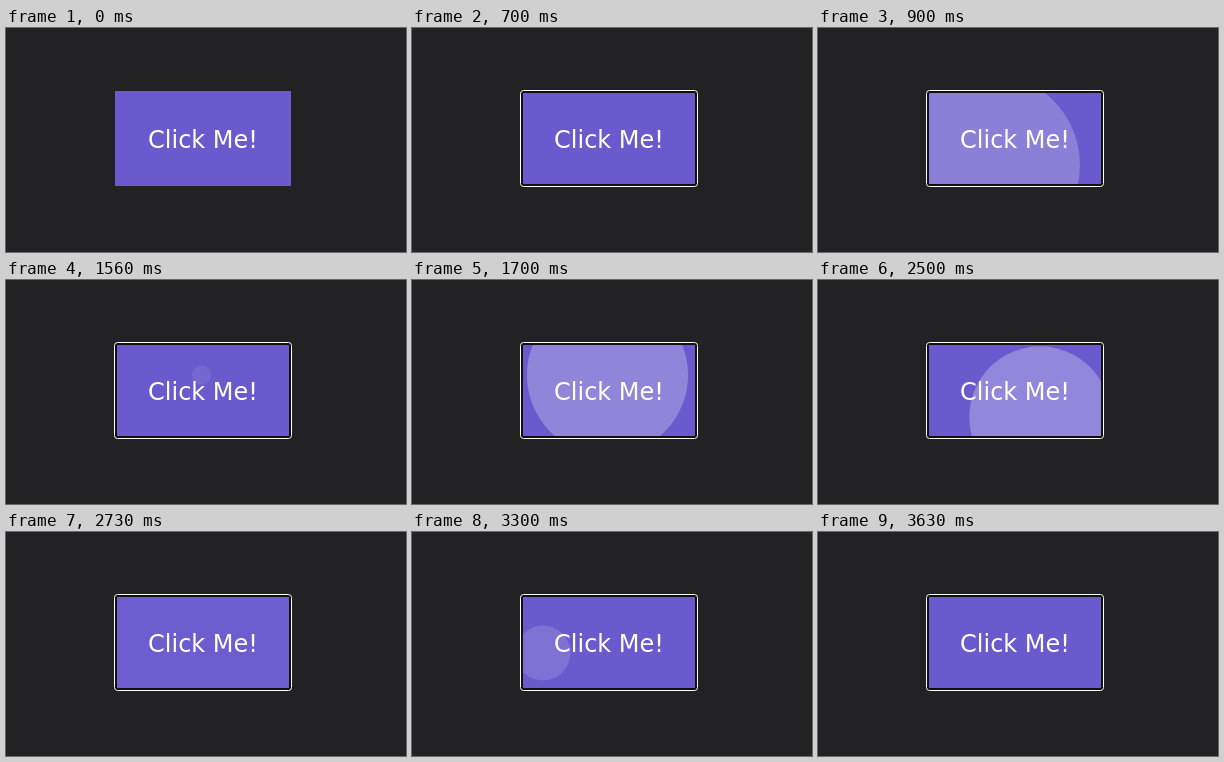
Write an HTML page that moves like this. It is 400 px wide and 224 px high and loops after 4.03 s.

```html
<!DOCTYPE html>
<html lang="en">
<head>
<meta charset="utf-8">
<title>Ripple button</title>
<style>
  html, body { margin: 0; height: 100%; overflow: hidden; background: #222224; }
  svg { display: block; width: 400px; height: 224px; }
  text { font: 24px "DejaVu Sans", sans-serif; fill: #fff; text-anchor: middle; }
</style>
</head>
<body>
<svg viewBox="0 0 400 224">
  <clipPath id="face"><rect x="109" y="63" width="176" height="95"/></clipPath>
  <rect x="109" y="63" width="176" height="95" fill="#6a5acd"/>
  <circle id="ripple" fill="#fff" clip-path="url(#face)"/>
  <text x="197" y="120">Click Me!</text>
  <g id="ring" fill="none">
    <rect x="109.5" y="63.5" width="175" height="94" rx="2" stroke="#101010" stroke-width="3"/>
    <rect x="108.5" y="62.5" width="177" height="96" rx="3" stroke="#fff"/>
  </g>
</svg>
<script>
  const LOOP = 4030, STEP = 100 / 3;
  const DURATION = 500, RADIUS = 133, PEAK_TIME = 150, PEAK_OPACITY = 0.275;
  const ripple = document.getElementById('ripple');
  const ring = document.getElementById('ring');

  // "age" is how far the ripple has already run when it first shows
  const clicks = [
    { start: 700, length: 400, age: 3, x: 170, y: 137 },
    { start: 1560, length: 400, age: 42, x: 195.5, y: 95 },
    { start: 2430, length: 370, age: 88, x: 222, y: 137 },
    { start: 3300, length: 330, age: 80, x: 131, y: 121 }
  ];

  const bezier = (a, b, u) => 3 * a * u * (1 - u) ** 2 + 3 * b * u * u * (1 - u) + u ** 3;

  // CSS "ease": cubic-bezier(.25, .1, .25, 1)
  function ease(x) {
    let low = 0, high = 1;
    for (let i = 0; i < 24; i++) {
      const mid = (low + high) / 2;
      if (bezier(0.25, 0.25, mid) < x) low = mid; else high = mid;
    }
    return bezier(0.1, 1, low);
  }

  function opacityAt(age) {
    if (age < PEAK_TIME) return PEAK_OPACITY * age / PEAK_TIME;
    return PEAK_OPACITY * (1 - ease((age - PEAK_TIME) / (DURATION - PEAK_TIME)));
  }

  function draw(now) {
    const t = now % LOOP;
    const click = clicks.find(c => t >= c.start && t < c.start + c.length);
    ring.style.display = t < clicks[0].start ? 'none' : '';
    ripple.style.display = click ? '' : 'none';
    if (click) {
      const age = click.age + Math.floor((t - click.start) / STEP + 0.01) * STEP;
      ripple.setAttribute('cx', click.x);
      ripple.setAttribute('cy', click.y);
      ripple.setAttribute('r', RADIUS * ease(age / DURATION));
      ripple.setAttribute('opacity', opacityAt(age));
    }
  }

  const began = performance.now();
  function tick() {
    draw(performance.now() - began);
    requestAnimationFrame(tick);
  }
  tick();
</script>
</body>
</html>
```
